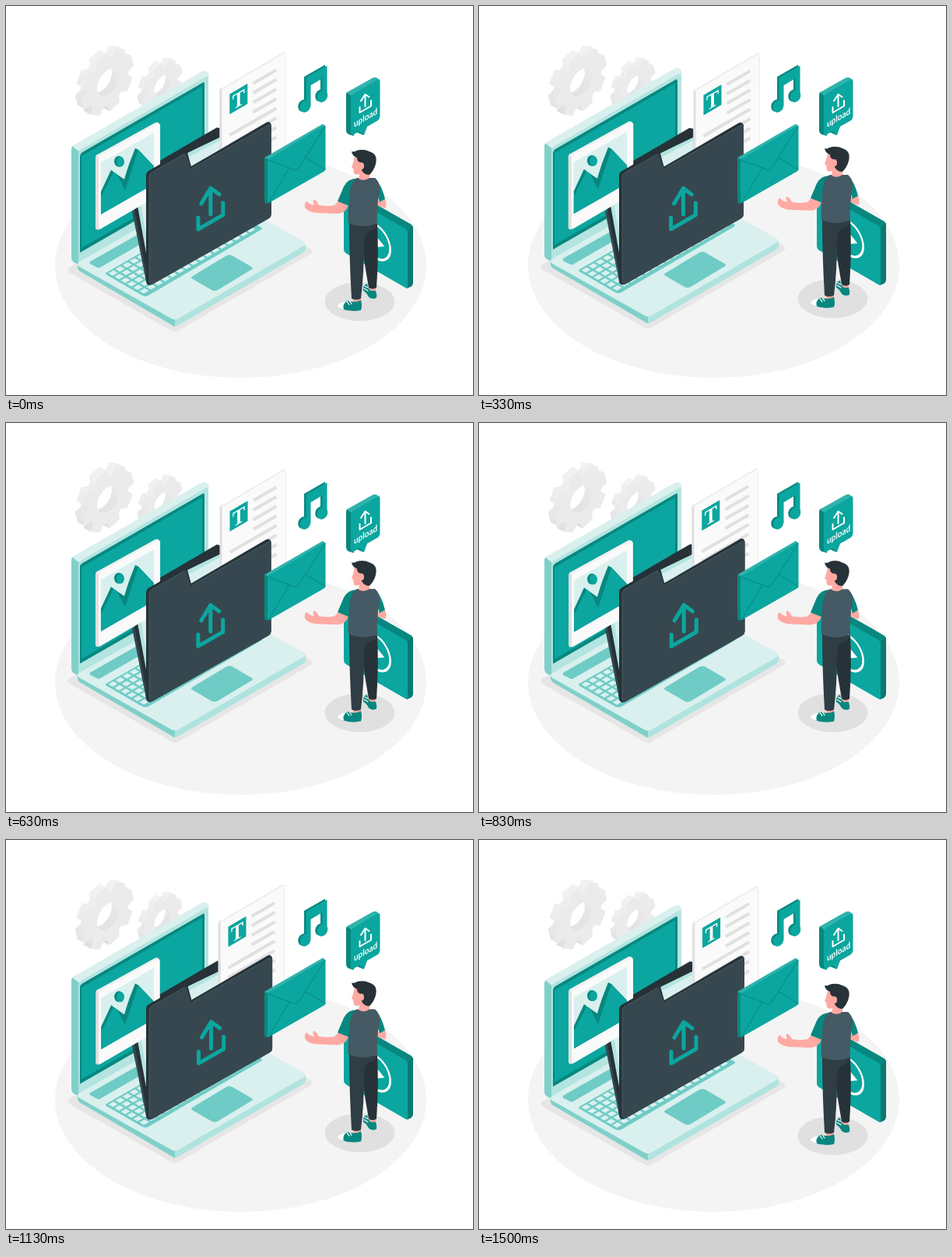
An HTML page that plays this animation: 600 px wide and 500 px high, repeating every 1540 ms.

```html
<!DOCTYPE html>
<html lang="en">
<head>
<meta charset="utf-8">
<title>Upload</title>
<style>
html, body { margin: 0; width: 100%; height: 100%; overflow: hidden; background: #fff; }
svg { display: block; width: 100%; height: 100%; }
.teal { fill: #0ba69f; } .deep { fill: #07877f; } .mid { fill: #6fcbc5; }
.pale { fill: #d9f0ee; } .soft { fill: #b3e4e0; } .edge { fill: #80d0ca; }
.slate { fill: #37474f; } .ink { fill: #263238; } .shirt { fill: #455a64; }
.paper { fill: #fafafa; } .grey { fill: #e0e0e0; } .skin { fill: #ffa9a3; } .white { fill: #fff; }
.line { fill: none; stroke-linecap: round; stroke-linejoin: round; }
.round { stroke-linejoin: round; }
</style>
</head>
<body>
<svg viewBox="0 0 600 500">
  <defs>
    <linearGradient id="rim" x1="0" y1="0" x2="0" y2="1">
      <stop offset="0" stop-color="#f2f2f2"/><stop offset="1" stop-color="#dedede"/>
    </linearGradient>
  </defs>
  <ellipse cx="301.5" cy="333.5" rx="238.5" ry="144.5" fill="#f4f4f4"/>
  <g id="gears"></g>

  <g class="bob">
    <path fill="#e6e6e6" d="M81 336Q77 340 82 343L212 417Q217 420 222 417L391 319Q396 316 391 312L260 238Z"/>
    <!-- lid -->
    <path class="edge" d="M84 184Q84 180 88 179L98 184V333L90 331Q84 329 84 323Z"/>
    <path class="pale" d="M85 180L250 85Q257 81 260 87L261 92L95 188Z"/>
    <path class="soft" d="M93 190Q93 186 97 184L255 92Q260 89 260 94V236L93 332Z"/>
    <path class="deep" d="M95 193Q95 190 98 188L252 99Q255 97 255 100V225L95 317Z"/>
    <path class="teal" d="M97 193L252 103V222L97 311Z"/>
    <!-- base -->
    <path class="edge" d="M92 332V336Q92 339 95 341L213 410Q215 412 218 412V402Z"/>
    <path fill="#b0e3df" d="M217 402V412Q219 412 222 410L382 317Q385 315 385 312V305Z"/>
    <path class="pale" d="M94 335Q90 332 94 329L260 234L383 303Q387 306 383 308L221 402Q217 404 213 402Z"/>
    <path class="mid" d="M109 332Q106 330 109 328L248 249L260 256L121 336Q119 337 117 336Z"/>
    <path class="mid" d="M130 346Q126 344 130 342L278 257L327 284Q331 286 327 288L183 372Q179 374 175 372Z"/>
    <g id="keys" class="pale"></g>
    <path class="mid" d="M240 351Q236 349 240 347L283 321Q287 319 291 321L315 335Q319 337 315 339L272 365Q268 367 264 365Z"/>
  </g>

  <g class="folder">
    <path class="ink" d="M158 222L271 156L276 157V300L185 358L180 352Z"/>
    <path class="slate" d="M162 264L165 262L183 357L180 354Z"/>
    <path class="soft" d="M169 257L200 205L276 168V250L186 350Z"/>
    <path class="pale" d="M174 257L200 213L276 172V250L188 345Z"/>
  </g>

  <g id="doc">
    <path class="grey" d="M274 107L277 104V195H274Z"/>
    <path fill="#f0f0f0" d="M274 107L356 59L359 60L277 108Z"/>
    <path class="paper" stroke="#e6e6e6" stroke-width=".7" d="M277 107L357 60Q359 59 359 61V190L277 215Z"/>
    <g id="rows" class="line" stroke="#e0e0e0" stroke-width="4" style="stroke-linecap:butt"></g>
    <path class="teal" d="M287 113L310 99.500V125.500L287 139Z"/>
    <text class="white" transform="matrix(.866 -.5 0 1 298.500 129)" text-anchor="middle" font-family="Liberation Serif, serif" font-weight="bold" font-size="28">T</text>
  </g>

  <g id="photo">
    <path class="grey" d="M115 195Q115 192 118 191L122 194V287L118 288Q115 288 115 285Z"/>
    <path fill="#f0f0f0" d="M116 192L192 150Q196 149 197 152L119 196Z"/>
    <path class="paper" d="M119 197Q119 194 122 192L194 152Q198 150 198 154V239Q198 242 195 244L123 286Q119 288 119 284Z"/>
    <path class="pale" d="M122 202L190 163V229L122 268Z"/>
    <path class="deep" d="M122 239L135 211L139 214L151 222L166 183L170 185L190 206V229L122 268Z"/>
    <path class="teal" d="M122 246L138 214L142 215L153 237L170 185L190 207V229L122 268Z"/>
    <path class="pale" d="M138 213L144 210L158 203L152 223Z"/>
    <ellipse class="deep" cx="145" cy="200" rx="6" ry="7"/>
    <ellipse class="teal" cx="147" cy="200.500" rx="5" ry="6.500"/>
  </g>

  <g class="folder">
    <path class="ink" d="M180 217Q180 214 183 212L228 186Q232 184 233 188L238 206L334 150Q339 147 341 152V268Q341 271 338 273L188 358Q181 361 180 354Z"/>
    <path class="slate" d="M184 219Q184 216 187 214L229 190Q231 189 232 192L236 205Q237 209 240 208L338 152Q341 151 341 154V268Q341 271 338 273L188 358Q184 360 184 356Z"/>
    <path class="line" stroke="#51656f" stroke-width=".7" d="M184 355V219Q184 216 187 214L229 190M240 208L339 152"/>
    <path class="line" stroke="#0ba69f" stroke-width="5" d="M263 268V237M251 254L263 234L274 242M247 272V287L279 268.500V253"/>
  </g>

  <!-- envelope -->
  <path class="deep" d="M332 195L338 196V253L334 254Q332 253 332 250Z"/>
  <path fill="#2fb3ad" d="M332 195L407 151.500L410 154L337 197Z"/>
  <path class="teal" d="M336 199Q336 197 338 196L408 154Q410.500 153 410.500 155V210Q410 212 408 213L338 253Q336 254 336 252Z"/>
  <path class="line" stroke="#07877f" d="M337 198L369 210Q373 212 376 208L410 155M338 252L364 208M385 195L410 210"/>

  <!-- music note -->
  <g id="note">
    <path d="M383 91L410 75.500V114H404V92L389 101V127H383Z"/>
    <ellipse cx="382" cy="128" rx="6.500" ry="8" transform="rotate(25 382 128)"/>
    <ellipse cx="404" cy="115" rx="6.500" ry="8" transform="rotate(25 404 115)"/>
  </g>

  <!-- speech bubble -->
  <path class="deep" d="M437 114Q437 111 440 110L447 112V167L440 165Q437 163 437 160Z"/>
  <path fill="#2fb3ad" d="M438 111L470 93Q473 91 476 92L480 95L444 116Z"/>
  <path class="deep" d="M448 161L459 166L462 156Z"/>
  <path class="teal" d="M443 118Q443 115 446 113L477 95Q480.500 93 480.500 97V142Q480 145 478 147L464 155L460 166L454 161L447 165Q443 168 443 163Z"/>
  <path class="line" stroke="#fff" stroke-width="2" d="M461.500 129V115M456 122L461.500 113.500L466.500 117M454.500 130V137L469 128.500V121.500"/>
  <text class="white" transform="matrix(.866 -.5 0 1 447 156)" font-family="Lato, sans-serif" font-weight="bold" font-size="11.500">upload</text>

  <g class="bob">
    <ellipse class="grey" cx="454.500" cy="380" rx="45" ry="25"/>
    <!-- video card -->
    <path class="deep" d="M434 241L439 237Q441 235 444 237L521 281L523 284L516 290Z"/>
    <path fill="#067a73" d="M515 289L523 283V356Q523 359 520 361L515 363Z"/>
    <path class="teal" d="M434 241L514 287Q516 288 516 291V360Q516 364 513 362L437 318Q434 316 434 313Z"/>
    <g transform="matrix(.866 .5 0 1 475 302.500)">
      <circle class="line" r="21.500" stroke="#fff" stroke-width="3"/>
      <path class="white" d="M-6-11L13 0L-6 11Z"/>
    </g>
    <!-- person -->
    <path class="skin" d="M446 373H456V383H446ZM466 358H475V368H467Z"/>
    <path class="deep" d="M459 362Q460 358 464 357Q465 364 469 366L475 366Q477 371 476 375Q471 378 466 374Q463 368 459 366Z"/>
    <path class="deep" d="M427 385Q433 380 440 379Q449 382 456 378Q458 385 456 391Q444 394 430 389Q426 388 427 385Z"/>
    <path class="white" d="M426 385Q431 380 437 380Q432 384 434 390Q426 389 426 385Z"/>
    <path class="line" stroke="#fff" stroke-width="1.200" d="M438 380L441 384M441.500 379.500L444 383M461 360L465 362M460 363L465 366"/>
    <path class="ink" d="M458 280L477 280Q479 320 476 362Q471 365 466 362Q461 335 458 310Z"/>
    <path fill="#2f3d45" d="M441 278L477 281Q477 286 466 290Q460 292 460 305Q460 345 456 376Q450 379 444 376Q441 325 441 278Z"/>
    <path class="skin" d="M476 251L487 248Q490 255 487 260L477 256Z"/>
    <path class="skin" d="M428 250L440 256Q437 266 426 267L402 266Q389 266 384 259Q383 251 387 251Q389 255 396 256Q393 250 396 249Q399 250 402 256Q414 258 422 256Z"/>
    <path class="deep" d="M474 221Q483 231 487 248L480 252L475 235Z"/>
    <path class="deep" d="M452 222Q440 221 434 232L426 251L441 257L448 232Z"/>
    <path class="shirt" d="M451 221H474Q481 227 480 237Q476 257 477 279Q460 287 440 279Q439 266 441 250Q441 226 451 221Z"/>
    <path class="skin" d="M448 193Q446 203 444 207L446 209L447 215Q449 218 454 216L453 222Q460 226 467 221V200Z"/>
    <path class="ink" d="M444 187Q448 188 450 186Q459 183 467 187Q478 190 475 203Q473 211 467 217Q460 217 457 211L455 201Q451 200 451 195Q445 193 444 187Z"/>
    <ellipse class="skin" cx="456.500" cy="205.500" rx="3.500" ry="4.500"/>
  </g>
</svg>
<script>
const $ = q => document.querySelector(q);
const LOOP = 1540, TAU = 2 * Math.PI;

// Eight-toothed gear outline with a round hole
function gearPath() {
  const points = [];
  for (let i = 0; i < 8; i++)
    for (const [deg, r] of [[-16, 29], [-11, 37.500], [11, 37.500], [16, 29]]) {
      const a = (i * 45 - 15 + deg) * TAU / 360;
      points.push((r * Math.cos(a)).toFixed(1) + ' ' + (r * Math.sin(a)).toFixed(1));
    }
  return `M${points.join('L')}ZM17 0A17 17 0 1 0-17 0A17 17 0 1 0 17 0Z`;
}

function gear(x, y, size) {
  let out = '';
  for (let depth = 9; depth >= 0; depth--) {
    const fill = depth ? 'url(#rim)' : '#ebebeb';
    out += `<path class="round" fill-rule="evenodd" fill="${fill}" stroke="${fill}" stroke-width="2" d="${gearPath()}"
      transform="translate(${x} ${y}) scale(${size}) translate(${-depth} ${-depth / 2}) matrix(.866 -.5 0 1 0 0)"/>`;
  }
  return out;
}
$('#gears').innerHTML = gear(201, 102.5, .77) + gear(131, 98, 1);

let keys = '';
for (let row = 0; row < 6; row++)
  for (let col = 0; col < 16; col++) {
    const x = 131.5 + col * 9.1 + row * 8, y = 343.6 - col * 5.25 + row * 4.6;
    keys += `M${x} ${y}l6.500-3.750 5.600 3.200-6.500 3.750Z`;
  }
$('#keys').innerHTML = `<path d="${keys}"/>`;

let rows = '';
for (let i = 0; i < 8; i++) {
  const x = i < 4 ? 317 : 287, y = 82 + i * 12.3;
  rows += `M${x} ${y + (347 - x) * .577}L347 ${y}`;
}
$('#rows').innerHTML = `<path d="${rows}"/>`;

const note = $('#note').innerHTML;
$('#note').innerHTML = `<g class="deep">${note}</g><g class="teal" transform="translate(2.500 1)">${note}</g>`;

const move = (q, transform) =>
  document.querySelectorAll(q).forEach(el => el.setAttribute('transform', transform));

const scaleAt = (x, y, s) => `translate(${x} ${y}) scale(${s}) translate(${-x} ${-y})`;

function draw() {
  const phase = (performance.now() % LOOP + 50) / LOOP * TAU;
  const sway = Math.sin(phase);
  move('.bob', `translate(0 ${-4 * (1 - Math.cos(phase))})`);
  move('#doc', `translate(${1.5 * sway} ${1.4 * sway})`);
  move('#photo', `translate(0 ${-1.2 * sway}) ` + scaleAt(157, 220, 1 + .006 * sway));
  move('.folder', scaleAt(180, 270, 1 - .007 * sway));
  requestAnimationFrame(draw);
}
draw();
</script>
</body>
</html>
```
